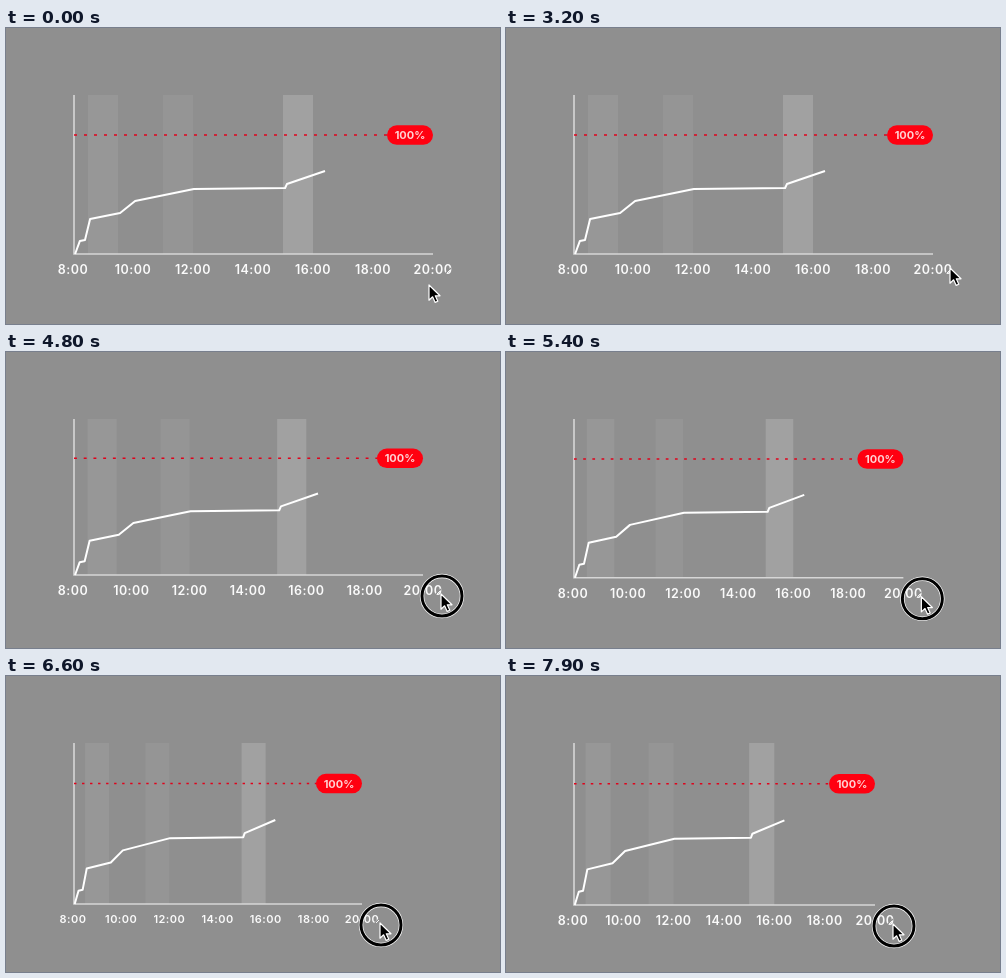
These frames come from a looping animation (494x296 px, 8000 ms). An HTML page:

```html
<!DOCTYPE html>
<html lang="en">
<head>
<meta charset="utf-8">
<title>Resizable chart</title>
<style>
  html, body { margin: 0; width: 100%; height: 100%; overflow: hidden; background: #8f8f8f; }
  svg { display: block; width: 494px; height: 296px; }
  text { font-family: Inter, sans-serif; text-anchor: middle; }
  .label { font-weight: 600; letter-spacing: .45px; fill: #fafafa; }
  .limit { font-size: 11px; font-weight: 700; fill: #ffd0d2; }
</style>
</head>
<body>
<svg id="stage" viewBox="0 0 494 296"></svg>
<script>
const LOOP = 8000, STEP = 100, LEFT = 67, TOP = 67;
const HIDE = 400, SHOW = 1300, PRESS = 3800, DRAG = 4200;

// turning points of the pointer: time, x, y
const path = [
  [0, 423, 257], [100, 447, 269], [300, 464, 272],
  [SHOW, 483, 229], [1900, 434, 242], [2100, 451, 244], [2500, 442, 238],
  [3000, 442, 238], [3200, 444, 240], [DRAG - STEP, 444, 240], [DRAG, 444, 242],
  [4500, 444, 242], [4800, 435, 242], [5900, 399, 247], [6600, 374, 247],
  [6800, 370, 247], [7500, 395, 248], [7900, 387, 248]
];

// hours after 8:00, share of the height
const curve = [
  [.07, 0], [.23, .082], [.4, .088], [.57, .22], [1.57, .258],
  [2.07, .333], [4.03, .409], [7.07, .415], [7.13, .44], [8.4, .522]
];

// start hour, opacity
const bands = [[.5, .065], [3, .05], [7, .16]];

const stage = document.getElementById("stage");

function set(el, attrs) {
  for (const key in attrs) el.setAttribute(key, attrs[key]);
  return el;
}

function add(tag, attrs, text) {
  const el = set(document.createElementNS("http://www.w3.org/2000/svg", tag), attrs);
  if (text) el.textContent = text;
  return stage.appendChild(el);
}

function pointerAt(t) {
  const i = path.findIndex(k => k[0] > t);
  if (i < 0) return path[path.length - 1].slice(1);
  const a = path[i - 1], b = path[i];
  const p = (t - a[0]) / (b[0] - a[0]);
  return [1, 2].map(n => a[n] + (b[n] - a[n]) * p);
}

const show = on => on ? "visible" : "hidden";

add("rect", { width: 494, height: 296, fill: "#8f8f8f" });
const bandEls = bands.map(b => add("rect", { y: TOP, fill: "#fff", "fill-opacity": b[1] }));
const axes = add("path", { fill: "none", stroke: "#d6d6d6", "stroke-width": 1.6 });
const limit = add("line", { x1: LEFT + 1, stroke: "#e0021b", "stroke-width": 1.4 });
const line = add("polyline", { fill: "none", stroke: "#fff", "stroke-width": 2, "stroke-linejoin": "round" });
const pill = add("rect", { width: 46, height: 19.6, rx: 9.8, fill: "#ff0010" });
const pillText = add("text", { class: "limit" }, "100%");
const labels = Array.from({ length: 7 }, (_, i) => add("text", { class: "label" }, 8 + 2 * i + ":00"));
const grip = [
  add("path", { d: "M-3 6L4 -1", stroke: "#8f8f8f", "stroke-width": 1.2 }),
  add("path", { d: "M0 4L3 1", stroke: "#f4f4f4", "stroke-width": 1 })
];
const rings = [["#fff", 4.4], ["#000", 3]].map(([stroke, w]) =>
  add("circle", { r: 20, fill: "none", stroke, "stroke-width": w }));
const pointer = add("path", {
  d: "M0 0V15.2L3.6 11.8L6.2 17.4L8.8 16.2L6.3 10.8H11Z",
  fill: "#000", stroke: "#fff", "stroke-width": 1.2, "stroke-linejoin": "round"
});

function drawChart(right, bottom) {
  const hour = (right - LEFT) / 12, height = bottom - TOP;
  const px = h => LEFT + h * hour;
  const py = v => bottom - v * height;
  const limitY = py(.748);
  const size = hour < 25.05 ? 11 : 12.5;

  bandEls.forEach((el, i) => set(el, { x: px(bands[i][0]), width: hour, height }));
  set(axes, { d: `M${LEFT + 1} ${TOP}V${bottom}H${right}` });
  set(limit, {
    x2: right - 40, y1: limitY, y2: limitY,
    "stroke-dasharray": `${hour * .1} ${hour * .2333}`
  });
  set(line, { points: curve.map(([h, v]) => px(h) + "," + py(v)).join(" ") });
  set(pill, { x: right - 46, y: limitY - 9.8 });
  set(pillText, { x: right - 23, y: limitY + 4 });
  labels.forEach((el, i) => set(el, { x: px(2 * i), y: bottom + 15.5 + size * .36, "font-size": size }));
  for (const el of grip) set(el, { transform: `translate(${right + 14} ${bottom + 15})` });
}

function drawPointer(t, x, y) {
  set(pointer, { transform: `translate(${x} ${y})`, visibility: show(t < HIDE || t >= SHOW) });
  for (const el of rings)
    set(el, { cx: x + 1, cy: y + 2, visibility: show(t >= PRESS) });
}

function render(ms) {
  const t = Math.floor((ms % LOOP) / STEP) * STEP;
  const [x, y] = pointerAt(t);
  // while dragged, the chart's corner follows the pointer
  if (t < DRAG) drawChart(427, 226);
  else drawChart(x - 18, y - 19);
  drawPointer(t, x, y);
}

const start = performance.now();
function tick() {
  render(performance.now() - start);
  requestAnimationFrame(tick);
}
tick();
</script>
</body>
</html>
```
